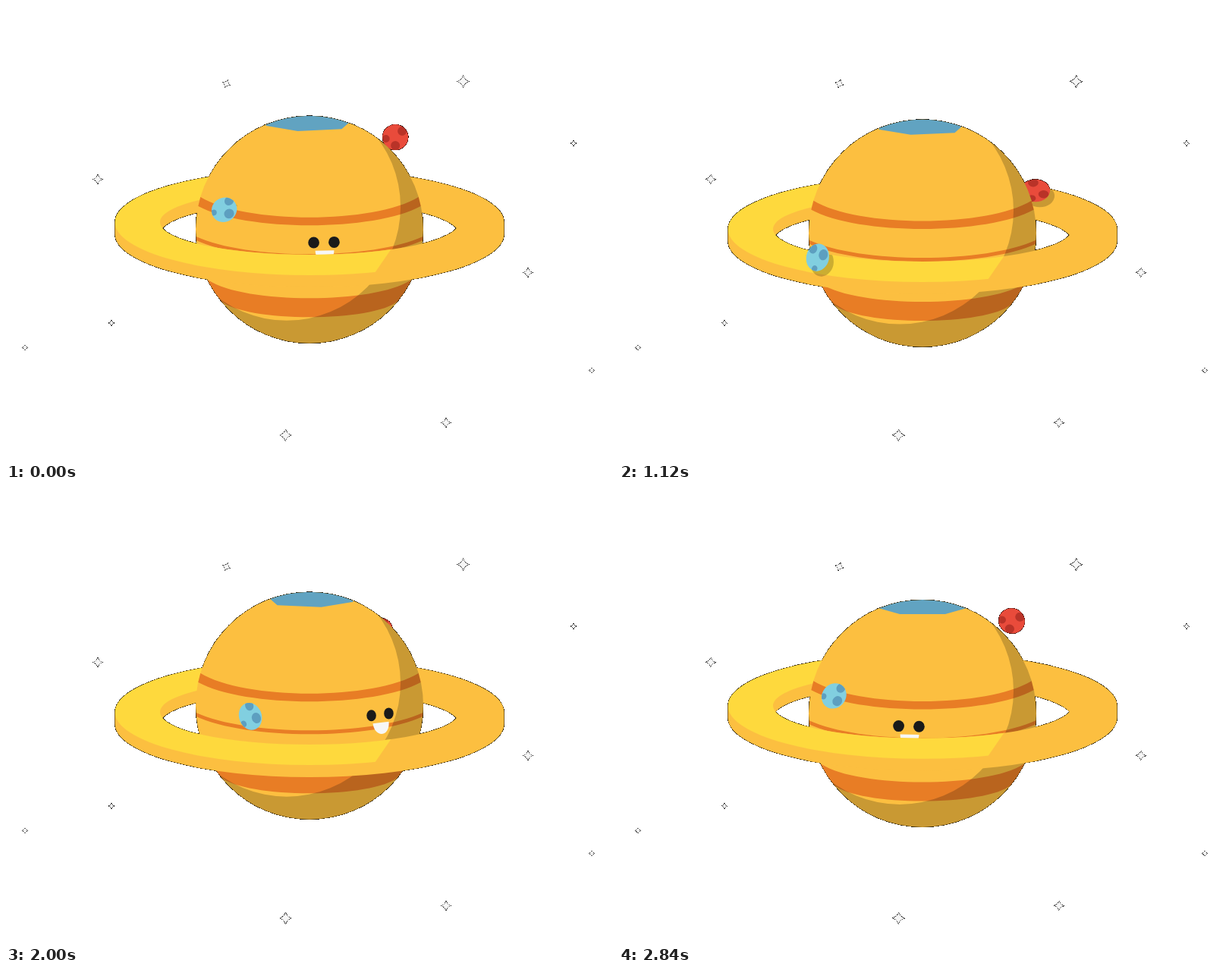
Write an HTML page with a canvas that moves like this. It is 800x600 px and loops after 2880 ms.

```html
<!DOCTYPE html>
<html lang="en">
<head>
<meta charset="utf-8">
<title>Ringed planet</title>
<style>
  html, body { margin: 0; width: 100%; height: 100%; overflow: hidden; background: #fff; }
  canvas { display: block; }
</style>
</head>
<body>
<canvas id="stage" width="800" height="600"></canvas>
<script>
const ctx = document.getElementById('stage').getContext('2d', { willReadFrequently: true });
const LOOP = 2880, STEP = 40, BOB = 1440, HOP = 720, SPIN = 960;
const TAU = Math.PI * 2, R = 150;
const ORANGE = '#fcbf40', YELLOW = '#fed93d', BAND = '#e87d25', CAP = '#61a3c1', SHADE = 'rgba(0,0,0,.2)';

// x, y, radius, twinkle phase
const STARS = [
  [602.5, 99.5, 8, 0], [368.5, 566, 8, 0], [290.5, 102.5, 6.5, .5], [121, 228.5, 6.5, 0],
  [688, 351.5, 6.5, 0], [580, 549.5, 6.5, 0], [748, 181, 3.8, 0], [139, 418, 3.8, 0],
  [25, 450.5, 3.8, 0], [772, 480.5, 3.8, 0]
];
// edge x, edge y, middle y for the upper and lower line of each stripe
const STRIPES = [
  [[144, -43, -16], [147, -31, -5.5]],
  [[152, 8, 32.5], [152, 13, 37.5]],
  [[133, 67, 90.5], [117, 94, 115.5]]
];
const RED = { land: 1090, x0: 552, x1: 472, top: 173, floor: 245, r: 17, color: '#e94b3b', spot: '#b93328',
  spots: [[-.73, 12, 6], [2.98, 12.5, 5], [1.57, 11, 6]] };
const BLUE = { land: 1160, x0: 257.5, x1: 335, top: 266, floor: 334, r: 16.5, color: '#81cfe0', spot: '#5d9fc0',
  spots: [[-1.1, 13, 6], [.7, 8.5, 6.5], [2.9, 14, 4]] };

const wave = (t, low, period) => (1 - Math.cos(TAU * (t - low) / period)) / 2;
const mod = (a, n) => ((a % n) + n) % n;

function fill(color, rule = 'nonzero') {
  ctx.fillStyle = color;
  ctx.fill(rule);
}

function oval(x, y, rx, ry, color) {
  ctx.beginPath();
  ctx.ellipse(x, y, rx, ry, 0, 0, TAU);
  if (color) fill(color);
}

function layer(x, y, draw) {
  ctx.save();
  ctx.translate(x, y);
  draw();
  ctx.restore();
}

function star([x, y, r, phase], t) {
  const k = wave(t, 60 + phase * SPIN, SPIN);
  layer(x, y, () => {
    ctx.rotate(k * .4);
    const s = r * (1 - k * (r < 5 ? .28 : .12)), c = s * .2;
    ctx.beginPath();
    ctx.moveTo(0, -s);
    ctx.quadraticCurveTo(c, -c, s, 0);
    ctx.quadraticCurveTo(c, c, 0, s);
    ctx.quadraticCurveTo(-c, c, -s, 0);
    ctx.quadraticCurveTo(-c, -c, 0, -s);
    fill('#f6f6f6');
  });
}

function ringPath() {
  const a = Math.asin(8 / 43);
  ctx.beginPath();
  ctx.ellipse(400, 8, 256.5, 70, 0, 0, Math.PI);
  ctx.ellipse(400, -8, 256.5, 70, 0, Math.PI, TAU);
  ctx.closePath();
  ctx.moveTo(400 + 197 * Math.cos(a), 0);
  ctx.ellipse(400, -8, 197, 43, 0, a, Math.PI - a);
  ctx.ellipse(400, 8, 197, 43, 0, Math.PI + a, TAU - a);
  ctx.closePath();
}

function ring() {
  ringPath();
  fill(ORANGE, 'evenodd');
  ctx.globalCompositeOperation = 'source-atop';
  polygon([[100, -120], [400, -120], [400, 0], [526, 0], [508, 27], [486, 59], [478, 70], [100, 100]]);
  ctx.clip();
  ctx.beginPath();
  ctx.ellipse(400, -8, 256.5, 70, 0, 0, TAU);
  ctx.moveTo(597, -8);
  ctx.ellipse(400, -8, 197, 43, 0, 0, TAU);
  fill(YELLOW, 'evenodd');
}

function polygon(points) {
  ctx.beginPath();
  points.forEach(p => ctx.lineTo(...p));
  ctx.closePath();
}

function stripe([[ax, ay, am], [bx, by, bm]]) {
  const bend = (y, mid) => (mid - y / 4) / .75;
  const c = bend(ay, am), d = bend(by, bm);
  ctx.beginPath();
  ctx.moveTo(-ax - 6, ay - 4);
  ctx.lineTo(-ax, ay);
  ctx.bezierCurveTo(-85, c, 85, c, ax, ay);
  ctx.lineTo(ax + 6, ay - 4);
  ctx.lineTo(bx + 6, by - 4);
  ctx.lineTo(bx, by);
  ctx.bezierCurveTo(85, d, -85, d, -bx, by);
  ctx.lineTo(-bx - 6, by - 4);
  fill(BAND);
}

function cap(t) {
  const turn = Math.PI / 4 - TAU * t / SPIN;
  polygon([0, 1, 2, 3, 4, 5].map(i => {
    const a = turn + i * Math.PI / 3, s = Math.sin(a);
    return [60 * Math.cos(a), -139.5 + s * (s < 0 ? 25 : 10)];
  }));
  fill(CAP);
}

function face(t) {
  const x = 19 + 37 * (mod(t + SPIN / 2, SPIN) - SPIN / 2) / STEP;
  if (Math.abs(x) > 165) return;
  const w = Math.sqrt(1 - (x / 175) ** 2);
  const rise = px => .00065 * px * px;
  for (const side of [-1, 1]) {
    const ex = x + side * 13.5 * w;
    oval(ex, 17.3 - rise(ex), 7.4 * w, 7.5, '#1a1a1a');
  }
  layer(x + 1, 28 - rise(x), () => {
    ctx.rotate(-.0013 * x);
    ctx.beginPath();
    ctx.moveTo(-12.5 * w, 0);
    ctx.lineTo(12.5 * w, 0);
    ctx.bezierCurveTo(12 * w, 20, -12 * w, 20, -12.5 * w, 0);
    fill('#f7f7f7');
  });
}

function planet(t) {
  oval(0, 0, R, R, ORANGE);
  ctx.clip();
  ctx.globalCompositeOperation = 'source-atop';
  STRIPES.forEach(stripe);
  cap(t);
  face(t);
  ctx.beginPath();
  ctx.rect(-160, -160, 320, 320);
  ctx.arc(-30, -30, R, 0, TAU);
  fill(SHADE, 'evenodd');
}

// Hops between two spots: steady sideways, accelerating away from the top of the arc.
function hop(m, t) {
  const p = mod(t - m.land, BOB) / HOP;
  const back = p >= 1, u = p % 1, d = u * 2 - 1, v = Math.abs(d);
  const x = m.x0 + (m.x1 - m.x0) * (back ? 2 - p : p);
  const y = Math.min(m.top + 86 * v ** 2.3, m.floor);
  const vx = (m.x1 - m.x0) / HOP * (back ? -1 : 1);
  const vy = Math.sign(d) * .55 * v ** 1.3;
  const squash = v > .9;
  const ratio = squash ? 1.3 : 1 + .22 * Math.min(1, v * 1.6);
  return { x, y, angle: squash ? 0 : Math.atan2(vy, vx), ratio };
}

function moonShape(m, h, dx, dy, draw) {
  layer(h.x + dx, h.y + dy, () => {
    const s = Math.sqrt(h.ratio);
    ctx.rotate(h.angle);
    ctx.scale(s, 1 / s);
    ctx.rotate(-h.angle);
    draw();
  });
}

function moon(m, t, ringY) {
  const h = hop(m, t);
  ctx.save();
  ctx.translate(0, ringY);
  ringPath();
  ctx.clip('evenodd');
  ctx.translate(0, -ringY);
  ctx.globalCompositeOperation = 'source-atop';
  moonShape(m, h, 6, 7, () => oval(0, 0, m.r, m.r, SHADE));
  ctx.restore();
  moonShape(m, h, 0, 0, () => {
    oval(0, 0, m.r, m.r, m.color);
    ctx.clip();
    ctx.globalCompositeOperation = 'source-atop';
    ctx.rotate(-TAU * t / SPIN);
    for (const [a, d, r] of m.spots) oval(d * Math.cos(a), d * Math.sin(a), r, r, m.spot);
  });
}

// Soft edge pixels become solid and dark, which gives the thin rough outline.
function hardenEdges() {
  const image = ctx.getImageData(0, 0, 800, 600), px = image.data;
  for (let i = 3; i < px.length; i += 4) {
    const a = px[i];
    if (a === 0 || a === 255) continue;
    for (let c = i - 3; c < i; c++) px[c] = px[c] * a / 255;
    px[i] = a > 12 ? 255 : 0;
  }
  ctx.putImageData(image, 0, 0);
}

function render(t) {
  const planetY = 284.7 + 15 * wave(t, 440, BOB);
  const ringY = 292 + 15 * wave(t, 120, BOB);
  ctx.clearRect(0, 0, 800, 600);
  STARS.forEach(s => star(s, t));
  layer(0, ringY, ring);
  moon(RED, t, ringY);
  layer(400, planetY, () => planet(t));
  layer(0, ringY, () => {
    ctx.beginPath();
    ctx.rect(246, 0, 308, 100);
    ctx.clip();
    ring();
  });
  moon(BLUE, t, ringY);
  hardenEdges();
}

let shown = -1;
function tick() {
  const t = Math.floor(performance.now() / STEP) * STEP % LOOP;
  if (t !== shown) render(shown = t);
  requestAnimationFrame(tick);
}
tick();
</script>
</body>
</html>
```
